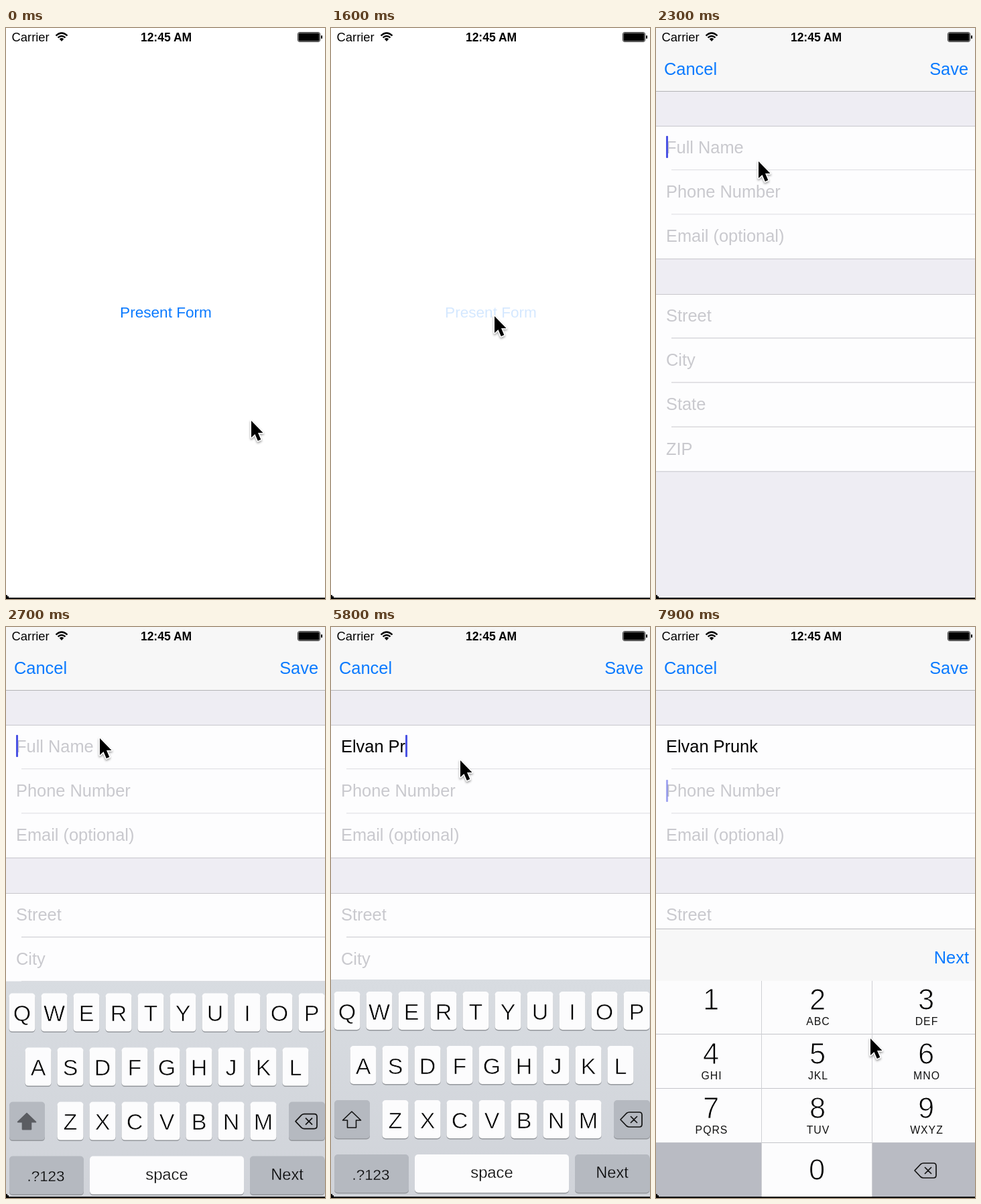
Animation, 476 px wide and 852 px high, one loop 8000 ms. Source, as an HTML page:

```html
<!DOCTYPE html>
<html lang="en">
<head>
<meta charset="utf-8">
<title>Form</title>
<style>
  html, body { margin: 0; width: 100%; height: 100%; overflow: hidden; background: #fff; }
  svg { display: block; width: 476px; height: 852px; }
  text { font-family: "Liberation Sans", Arial, Helvetica, sans-serif; white-space: pre; }
</style>
</head>
<body>
<svg id="stage" viewBox="0 0 476 852"></svg>
<script>
const NS = "http://www.w3.org/2000/svg";
const LOOP = 8000, STEP = 100;
const BLUE = "#0a7aff", HINT = "#c9c9ce", LINE = "#c8c7cc", GREY = "#b5b9c0", WHITE = "#fcfcfd";
const NAME = "Elvan Prunk", FONT = 25.4, ROW = 66.2, KEY_ROW = 81;
const stage = document.getElementById("stage");

function el(parent, tag, attrs = {}) {
  const node = document.createElementNS(NS, tag);
  for (const k in attrs) node.setAttribute(k, attrs[k]);
  return parent.appendChild(node);
}
const group = (parent, attrs) => el(parent, "g", attrs);
const rect = (parent, x, y, width, height, fill, more) =>
  el(parent, "rect", { x, y, width, height, fill, ...more });
const path = (parent, d, more) => el(parent, "path", { d, fill: "none", ...more });
function label(parent, str, x, y, size, fill = "#000", more) {
  const node = el(parent, "text", { x, y, "font-size": size, fill, ...more });
  node.textContent = str;
  return node;
}
const mid = { "text-anchor": "middle" }, end = { "text-anchor": "end" };
// A stroke in the background colour makes the letters lighter.
const thin = (bg, w) => ({ ...mid, stroke: bg, "stroke-width": w });

// Start screen
rect(stage, 0, 0, 476, 852, "#fff");
const button = label(stage, "Present Form", 238.5, 432, 22.6, BLUE, mid);

// Form
const form = group(stage);
rect(form, 0, 0, 476, 852, "#eeedf3");
rect(form, 0, 0, 476, 94, "#f7f7f7");
rect(form, 0, 94, 476, 1, "#b4b4b6");
label(form, "Cancel", 12, 70, FONT, BLUE);
label(form, "Save", 466, 70, FONT, BLUE, end);

function section(top, names, line) {
  const height = ROW * names.length - 1.5;
  rect(form, 0, top, 476, height, "#fdfdfe");
  rect(form, 0, top - 1, 476, 1, LINE);
  rect(form, 0, top + height, 476, 1, LINE);
  return names.map((name, i) => {
    if (i) rect(form, 23, top - 2 + ROW * i, 453, 1, line);
    return label(form, name, 15, top + 40 + ROW * i, FONT, HINT);
  });
}
const [nameHint] = section(147, ["Full Name", "Phone Number", "Email (optional)"], "#dddde0");
section(398, ["Street", "City", "State", "ZIP"], LINE);
const typed = label(form, "", 15, 187, FONT);
const caret = rect(form, 0, 0, 3, 33, "#4a52e4", { rx: 1 });

// Accessory bar
const bar = group(stage);
rect(bar, 0, 0, 476, 78, "#f7f7f7");
rect(bar, 0, 0, 476, 1, "#bcbcc0");
label(bar, "Next", 467, 52, FONT, BLUE, end);

// Letter keyboard
const keys = group(stage);
const fade = el(el(stage, "defs"), "linearGradient", { id: "kb", x2: 0, y2: 1 });
el(fade, "stop", { offset: 0, "stop-color": "#d8dce1" });
el(fade, "stop", { offset: 1, "stop-color": "#d0d3d9" });
rect(keys, 0, 526, 476, 326, "url(#kb)");

function key(x, row, w, fill) {
  const y = 544 + KEY_ROW * row;
  rect(keys, x, y + 1.5, w, 57, "#94979c", { rx: 5 });
  rect(keys, x, y, w, 57, fill, { rx: 5 });
}
["QWERTYUIOP", "ASDFGHJKL", "ZXCVBNM"].forEach((row, r) => {
  const left = [24, 48, 96][r];
  [...row].forEach((ch, i) => {
    const x = left + 48 * i;
    key(x - 19.5, r, 39, WHITE);
    label(keys, ch, x, 585.5 + KEY_ROW * r, 34, "#000", thin(WHITE, 0.7));
  });
});
key(5, 2, 53, GREY);
key(422, 2, 54, GREY);
key(5, 3, 111, GREY);
key(125, 3, 230, WHITE);
key(364, 3, 111.5, GREY);
label(keys, ".?123", 59.5, 824.5, 22.4, "#000", thin(GREY, 0.4));
label(keys, "space", 240, 822, 23.8, "#000", thin(WHITE, 0.4));
label(keys, "Next", 419.5, 822, 23.6, "#000", thin(GREY, 0.4));
const shift = path(keys, "M31 723 L44.5 736 H37.5 V747 H24.5 V736 H17.5 Z",
  { "stroke-width": 1.6, "stroke-linejoin": "round" });

function backspace(parent, x, y) {
  path(parent, `M${x - 16} ${y} l9 -9.5 q2 -1.5 4 -1.5 h15 q4 0 4 4 v14 q0 4 -4 4 h-15 q-2 0 -4 -1.5 Z`
    + `M${x - 1} ${y - 5} l10 10 m0 -10 l-10 10`,
    { stroke: "#111", "stroke-width": 1.7, "stroke-linejoin": "round" });
}
backspace(keys, 448, 735);

// Number pad
const pad = group(stage);
rect(pad, 0, 528, 476, 324, WHITE);
for (const x of [0, 323]) rect(pad, x, 770, 157, 82, "#b9bbc3");
for (const i of [1, 2, 3]) rect(pad, 0, 526 + KEY_ROW * i, 476, 1, "#c4c5ca");
for (const x of [157, 322]) rect(pad, x, 528, 1, 324, "#cfd0d4");
const digit = (n, x, y) => label(pad, n, x, y, 43.5, "#000", thin(WHITE, 1.1));
["", "ABC", "DEF", "GHI", "JKL", "MNO", "PQRS", "TUV", "WXYZ"].forEach((hint, i) => {
  const x = 82 + 162 * (i % 3) - (i % 3 ? 3 : 0), y = 571 + KEY_ROW * Math.floor(i / 3);
  digit(i + 1, x, y);
  label(pad, hint, x + 1, y + 23, 15.8, "#111", { ...mid, "letter-spacing": 1 });
});
digit(0, 240, 825);
backspace(pad, 402, 811);

// Status bar
const status = group(stage);
label(status, "Carrier", 8.5, 20, 18.4);
label(status, "12:45 AM", 239, 20, 17.5, "#000", { ...mid, "font-weight": "bold" });
path(status, "M74.5 11.5 Q83 3.5 91.5 11.5 M77.5 14.3 Q83 9.5 88.5 14.3",
  { stroke: "#000", "stroke-width": 2.4 });
path(status, "M79.7 16.3 Q83 13.5 86.3 16.3 L83 20 Z", { fill: "#000" });
rect(status, 435.5, 6.5, 33, 14, "#fff", { rx: 2.5, stroke: "#333" });
rect(status, 436.5, 7.5, 31, 12, "#000", { rx: 1.5 });
rect(status, 470, 11, 2, 5, "#000", { rx: 1 });

// Window edge
path(stage, "M0 846 H2 V848 H4 V850 H476 V852 H0 Z", { fill: "#000" });

// Pointer
const pointer = group(stage, { style: "filter:drop-shadow(0 2px 1.5px rgba(0,0,0,.35))" });
path(pointer, "M0 0 V25 L5.5 20 L9.8 30 L14.3 28 L10 18 H17.5 Z",
  { fill: "#000", stroke: "#fff", "stroke-width": 3.2, "paint-order": "stroke", "stroke-linejoin": "round" });

// Motion
const PRESS = 1400, OPEN = 1700, FOCUS = 2200, TYPE = 4300, TYPED = 6200, PHONE = 7300;
const HOME = { x: 366, y: 586 };
const MOVES = [
  { at: 100, time: 1300, x: 244, y: 430 },
  { at: 2000, time: 600, x: 140, y: 166 },
  { at: 2900, time: 600, x: 193, y: 199 },
  { at: 6400, time: 800, x: 392, y: 784 },
  { at: PHONE, time: 600, x: 320, y: 614 },
];
const clamp = v => Math.min(1, Math.max(0, v));
const glide = (t, at, time) => 1 - (1 - clamp((t - at) / time)) ** 3;
const move = (node, x, y) => node.setAttribute("transform", `translate(${x} ${y})`);

function pointerAt(t) {
  return MOVES.reduce((p, m) => {
    const f = glide(t, m.at, m.time);
    return { x: p.x + (m.x - p.x) * f, y: p.y + (m.y - p.y) * f };
  }, HOME);
}

// Solid while typing, otherwise blinking once a second.
function caretAlpha(t) {
  if (t < FOCUS) return 0;
  if (t >= TYPE && t < TYPED) return 1;
  const since = t >= PHONE ? PHONE : t >= TYPED ? TYPED : FOCUS;
  return clamp(Math.abs((t - since) % 1000 - 800) / 200 - 0.5);
}

function lettersAt(t) {
  if (t < TYPE) return 0;
  const pace = (TYPED - TYPE) / (NAME.length - 1);
  return Math.min(NAME.length, 1 + Math.floor((t - TYPE) / pace));
}

function draw(t) {
  const count = lettersAt(t), phone = t >= PHONE;
  const swap = glide(t, PHONE - STEP, 400);
  const { x, y } = pointerAt(t);
  move(pointer, x, y);
  move(form, 0, 852 * (1 - glide(t, OPEN, 500)));
  move(keys, 0, 326 * (1 - glide(t, 2300, 500)));
  move(bar, 0, 528 - 78 * swap);
  button.setAttribute("opacity", t >= PRESS && t < FOCUS ? 0.17 : 1);
  bar.setAttribute("visibility", swap ? "visible" : "hidden");
  keys.setAttribute("visibility", swap < 1 ? "visible" : "hidden");
  pad.setAttribute("opacity", swap);

  typed.textContent = NAME.slice(0, count);
  nameHint.setAttribute("visibility", count ? "hidden" : "visible");
  const width = count && !phone ? typed.getComputedTextLength() : 0;
  caret.setAttribute("x", 15 + width);
  caret.setAttribute("y", phone ? 228 : 161);
  caret.setAttribute("opacity", caretAlpha(t));

  const upper = count === 0 || NAME[count - 1] === " ";
  shift.setAttribute("fill", upper ? "#5b5d62" : "none");
  shift.setAttribute("stroke", upper ? "#5b5d62" : "#111");
}

const start = performance.now();
function frame() {
  const t = (performance.now() - start) % LOOP;
  draw(Math.floor(t / STEP) * STEP);
  requestAnimationFrame(frame);
}
frame();
</script>
</body>
</html>
```
